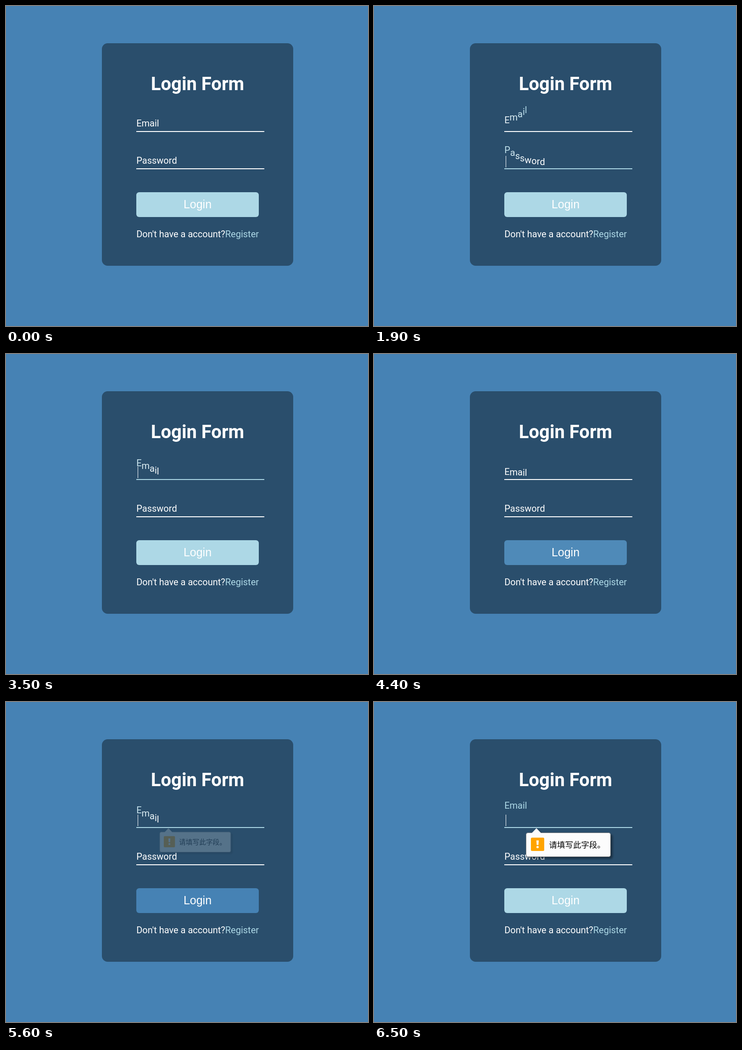
An HTML page for the animation above (6900 ms loop, 789 by 696 pixels).

```html
<!DOCTYPE html>
<html lang="en">
<head>
<meta charset="utf-8">
<title>Login Form</title>
<style>
  html, body { margin: 0; width: 100%; height: 100%; overflow: hidden; background: #4682b4; }
  svg { display: block; width: 789px; height: 696px; }
  text { font: 20px Roboto, sans-serif; fill: #fff; white-space: pre; }
  .title { font-size: 40px; font-weight: 700; text-anchor: middle; }
  .login { font: 25px "Liberation Sans", Arial, sans-serif; text-anchor: middle; }
  .tip { font: 17.5px "Noto Sans CJK SC", "Noto Sans CJK", sans-serif; fill: #000; }
</style>
</head>
<body>
<svg viewBox="0 0 789 696">
  <defs>
    <filter id="shade" x="-20%" y="-20%" width="140%" height="150%">
      <feDropShadow dx="4" dy="4" stdDeviation="2" flood-color="#000" flood-opacity=".4"/>
    </filter>
  </defs>
  <rect width="789" height="696" fill="#4682b4"/>
  <rect x="209" y="81" width="417" height="484" rx="12.5" fill="#2a4e6c"/>
  <text class="title" x="417.5" y="183">Login Form</text>
  <g id="fields"></g>
  <g id="button">
    <rect id="face" x="284" y="405" width="267" height="54" rx="6.25"/>
    <text class="login" x="417.5" y="440">Login</text>
  </g>
  <text x="284.2" y="503">Don't have a account?<tspan fill="#add8e6">Register</tspan></text>
  <g id="bubble">
    <g filter="url(#shade)">
      <rect x="331.5" y="284.5" width="184" height="52" rx="4" fill="#fcfcfc" stroke="#808080"/>
      <path d="M343.5 285.5 354 274.5 364.5 285.5Z" fill="#fcfcfc"/>
    </g>
    <rect x="342" y="295" width="29" height="29" rx="2.5" fill="#ffa400"/>
    <path d="M354 301h5l-.6 10h-3.8z" fill="#fff"/>
    <circle cx="356.5" cy="315.6" r="2.5" fill="#fff"/>
    <text class="tip" x="381.5" y="317">请填写此字段。</text>
  </g>
</svg>
<script>
const LOOP = 6900, STEP = 100;
const WAVE = 450, STAGGER = 19, LIFT = 30;
const WHITE = [255, 255, 255], LIGHT = [173, 216, 230], STEEL = [70, 130, 180];
const $ = id => document.getElementById(id);

function add(parent, tag, attrs, text = '') {
  const el = document.createElementNS('http://www.w3.org/2000/svg', tag);
  for (const k in attrs) el.setAttribute(k, attrs[k]);
  el.textContent = text;
  return parent.appendChild(el);
}

function bezier(x1, y1, x2, y2) {
  const at = (a, b, s) => 3 * (1 - s) ** 2 * s * a + 3 * (1 - s) * s * s * b + s ** 3;
  return x => {
    if (x <= 0) return 0;
    if (x >= 1) return 1;
    let lo = 0, hi = 1;
    for (let i = 0; i < 30; i++) {
      const mid = (lo + hi) / 2;
      if (at(x1, x2, mid) < x) lo = mid; else hi = mid;
    }
    return at(y1, y2, lo);
  };
}
const back = bezier(.68, -.55, .265, 1.55);
const ease = bezier(.25, .1, .25, 1);
const standard = bezier(.4, 0, .2, 1);

const mix = (a, b, p) => `rgb(${a.map((v, i) => Math.round(v + (b[i] - v) * p))})`;

const pen = document.createElement('canvas').getContext('2d');
pen.font = '20px Roboto, sans-serif';

// spans: [focus, blur] times in ms
function makeField(word, base, spans) {
  const g = $('fields');
  let x = 284.2;
  const letters = [...word].map(ch => {
    const el = add(g, 'text', { x, y: base }, ch);
    x += pen.measureText(ch).width;
    return el;
  });
  const line = add(g, 'rect', { x: 284, y: base + 10, width: 279, height: 2 });
  const caret = add(g, 'rect', { x: 287, y: base - 17, width: 1, height: 25, fill: '#fff' });
  return { letters, line, caret, base, spans };
}

const fields = [
  makeField('Email', 262, [[450, 1660], [3275, 3970], [5370, Infinity]]),
  makeField('Password', 343, [[1660, 2523]])
];

function drawField({ letters, line, caret, base, spans }, t) {
  const span = spans.filter(s => s[0] <= t).pop();
  const focused = !!span && t < span[1];
  letters.forEach((el, i) => {
    let p = 0;
    if (span) {
      const from = focused ? span[0] : span[1];
      const k = back((t - from - i * STAGGER) / WAVE);
      p = focused ? k : 1 - k;
    }
    el.setAttribute('y', base - LIFT * p);
    el.style.fill = mix(WHITE, LIGHT, p);
  });
  line.setAttribute('fill', mix(WHITE, LIGHT, focused ? 1 : 0));
  const shown = focused && Math.floor((t - Math.ceil(span[0] / STEP) * STEP) / 500) % 2 === 0;
  caret.setAttribute('visibility', shown ? 'visible' : 'hidden');
}

const zoom = (x, y, k) => `translate(${x} ${y}) scale(${k}) translate(${-x} ${-y})`;

function draw(t) {
  fields.forEach(f => drawField(f, t));

  const hover = ease((t - 4080) / 500) - ease((t - 5980) / 500);
  $('face').setAttribute('fill', mix(LIGHT, STEEL, hover));
  const pressed = t >= 5300 && t < 5400;
  $('button').setAttribute('transform', zoom(417.5, 432, pressed ? .98 : 1));

  const open = standard((t - 5490) / 467);
  $('bubble').setAttribute('opacity', open);
  $('bubble').setAttribute('transform', zoom(354, 274, .8 + .2 * open));
}

const start = performance.now();
function tick() {
  const t = Math.max(0, performance.now() - start) % LOOP;
  draw(Math.floor(t / STEP) * STEP);
  requestAnimationFrame(tick);
}
tick();
</script>
</body>
</html>
```
